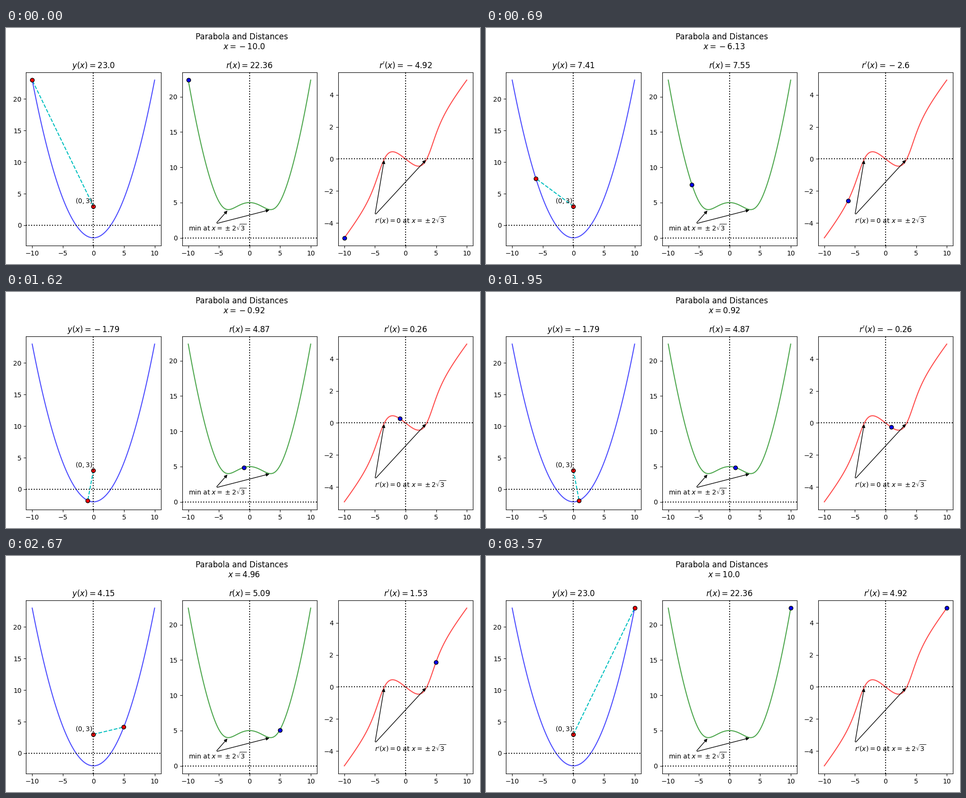
A matplotlib script that plays this animation: 1000x500 px, repeating every 3.6 s.

```python
import numpy as np
import matplotlib.pyplot as plt
from matplotlib.animation import FuncAnimation

FRAMES = 120
INTERVAL = 30
ROOT = 2 * np.sqrt(3)
FOCUS = (0, 3)


def height(x):
    return x**2 / 4 - 2


def distance(x):
    return np.hypot(x, height(x) - FOCUS[1])


def slope(x):
    return x * (1 + (height(x) - FOCUS[1]) / 2) / distance(x)


def label(name, value):
    return f"${name} = {round(float(value), 2)}$"


def heading(x):
    return "Parabola and Distances \n " + label("x", x)


def point_at_roots(ax, start, y):
    for x in (-ROOT, ROOT):
        ax.annotate("", xy=(x, y), xytext=start,
                    arrowprops=dict(arrowstyle="-|>", facecolor="black"))


xs = np.linspace(-10, 10, FRAMES)
fig, axes = plt.subplots(1, 3, figsize=(10, 5), dpi=100)
curves = [("y(x)", height, "b", "r"),
          ("r(x)", distance, "g", "b"),
          ("r'(x)", slope, "r", "b")]

link, = axes[0].plot([], [], "c--")
axes[0].plot(*FOCUS, "ro", mec="k")
axes[0].text(-3, 3.5, "$(0, 3)$")

dots = []
for ax, (name, func, color, dot_color) in zip(axes, curves):
    ax.plot(xs, func(xs), color=color, alpha=0.7)
    ax.axhline(0, color="k", ls=":")
    ax.axvline(0, color="k", ls=":")
    dots += ax.plot(xs[:1], func(xs[:1]), "o", color=dot_color, mec="k")
    ax.set_title(label(name, func(xs[0])))

axes[1].text(-10, 1, r"min at $x = \pm 2\sqrt{3}$")
point_at_roots(axes[1], (-5.5, 2), 4)
axes[2].text(-5, -4, r"$r'(x) = 0$ at $x = \pm 2\sqrt{3}$")
point_at_roots(axes[2], (-5, -3.5), 0)

suptitle = fig.suptitle(heading(xs[0]))
fig.tight_layout()


def update(frame):
    x = xs[frame]
    suptitle.set_text(heading(x))
    link.set_data([FOCUS[0], x], [FOCUS[1], height(x)])
    for ax, dot, (name, func, *_) in zip(axes, dots, curves):
        dot.set_data([x], [func(x)])
        ax.set_title(label(name, func(x)))
    return [suptitle, link, *dots]


anim = FuncAnimation(fig, update, frames=FRAMES, interval=INTERVAL, repeat=True)
plt.show()
```
